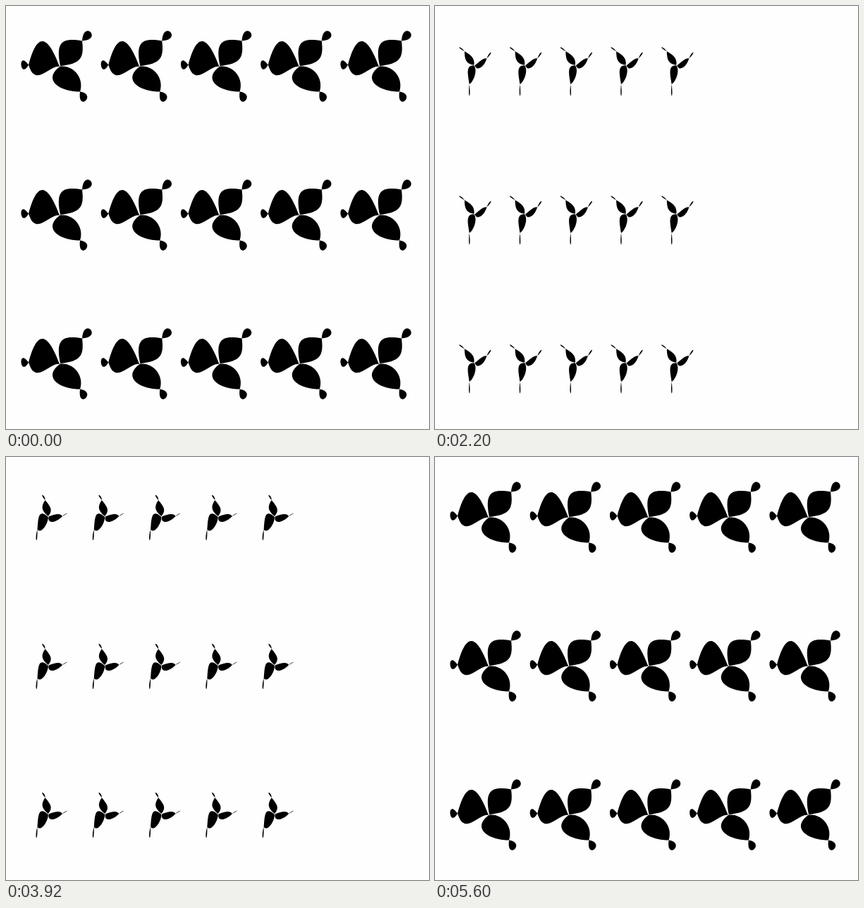
Animation, 600 px wide and 600 px high, one loop 5.72 s. Source, as an HTML page with a canvas:

```html
<!DOCTYPE html>
<html lang="en">
<head>
<meta charset="utf-8">
<style>
html, body { margin: 0; width: 100%; height: 100%; overflow: hidden; background: #fefdff; }
canvas { display: block; }
</style>
</head>
<body>
<canvas id="stage" width="600" height="600"></canvas>
<script>
const ctx = document.getElementById('stage').getContext('2d');
const LOOP = 5720, STEP = 40;

// Each arm: hub, two handles, neck, two tail handles, two handles back to the hub.
const WIDE = [
  [-.6, 2, -20.6, -52, -34.6, -39, -44.6, -.5, -56.6, 21.5, -60.6, -22.5, -34.6, 33, -14.6, -1],
  [.4, 1, -6.6, -34, 3.4, -39, 31.4, -34.5, 61.4, -36.5, 33.4, -65.5, 34.4, -10, 29.4, -2],
  [.4, 1.5, 21.4, 0, 34.4, 20, 28.4, 37.5, 24.4, 67.5, 53.4, 41.5, 1.4, 38, -26.6, 21]
];
const NARROW = [
  [-.6, 0, -11.6, 8, -5.1, 21, -.3, 34, 3.7, 56, -1.8, 57, 3.4, 23, 8.4, 9],
  [-.6, -.5, -12.6, 3, -16.6, -3, -21.1, -17.5, -33.6, -27, -36.6, -20, -10.6, -15, -3.6, -11],
  [.4, .2, 4.4, -5, 9.4, -16, 15.9, -17, 21.7, -36, 24.7, -30, 16.4, -4, 9.4, 8]
];

// Time in ms and amount of the change from wide to narrow.
const KEYS = [
  [0, 0], [300, 0], [880, .11], [1520, .469], [2080, .818], [2680, .99], [2960, 1],
  [3280, .955], [3900, .697], [4500, .316], [5080, .088], [5600, 0], [LOOP, 0]
];

const lerp = (a, b, u) => a + (b - a) * u;
const slope = i => (KEYS[i + 1][1] - KEYS[i][1]) / (KEYS[i + 1][0] - KEYS[i][0]);

function tangent(i) {
  if (i === 0 || i === KEYS.length - 1) return 0;
  const a = slope(i - 1), b = slope(i);
  return a * b > 0 ? 2 * a * b / (a + b) : 0;
}

// Monotone cubic through the keys.
function amount(t) {
  let i = 0;
  while (i < KEYS.length - 2 && t >= KEYS[i + 1][0]) i++;
  const [t0, a] = KEYS[i], [t1, b] = KEYS[i + 1];
  const d = t1 - t0, s = (t - t0) / d, r = 1 - s;
  return a * r * r * (1 + 2 * s) + b * s * s * (3 - 2 * s)
    + d * s * r * (r * tangent(i) - s * tangent(i + 1));
}

function motif(u) {
  const path = new Path2D();
  WIDE.forEach((arm, k) => {
    const p = arm.map((v, i) => lerp(v, NARROW[k][i], u));
    if (k === 0) {
      const bow = 4 * u * (1 - u);
      p[6] -= 1.7 * bow;
      p[7] -= 5 * bow;
    }
    const [hx, hy, ax, ay, bx, by, nx, ny, cx, cy, dx, dy, ex, ey, fx, fy] = p;
    path.moveTo(hx, hy);
    path.bezierCurveTo(ax, ay, bx, by, nx, ny);
    path.bezierCurveTo(cx, cy, dx, dy, nx, ny);
    path.bezierCurveTo(ex, ey, fx, fy, hx, hy);
    path.closePath();
  });
  return path;
}

function draw(t) {
  const u = amount(t), pitch = lerp(113.25, 65.25, u), path = motif(u);
  ctx.setTransform(1, 0, 0, 1, 0, 0);
  ctx.fillStyle = '#fefdff';
  ctx.fillRect(0, 0, 600, 600);
  ctx.fillStyle = '#000';
  for (let row = 0; row < 3; row++) {
    for (let col = 0; col < 5; col++) {
      ctx.setTransform(1, 0, 0, 1, 20 + pitch * (col + .5), 84 + 211 * row);
      ctx.fill(path);
    }
  }
}

const start = performance.now();
function tick() {
  const t = (performance.now() - start) % LOOP;
  draw(Math.floor(t / STEP) * STEP);
  requestAnimationFrame(tick);
}
tick();
</script>
</body>
</html>
```
